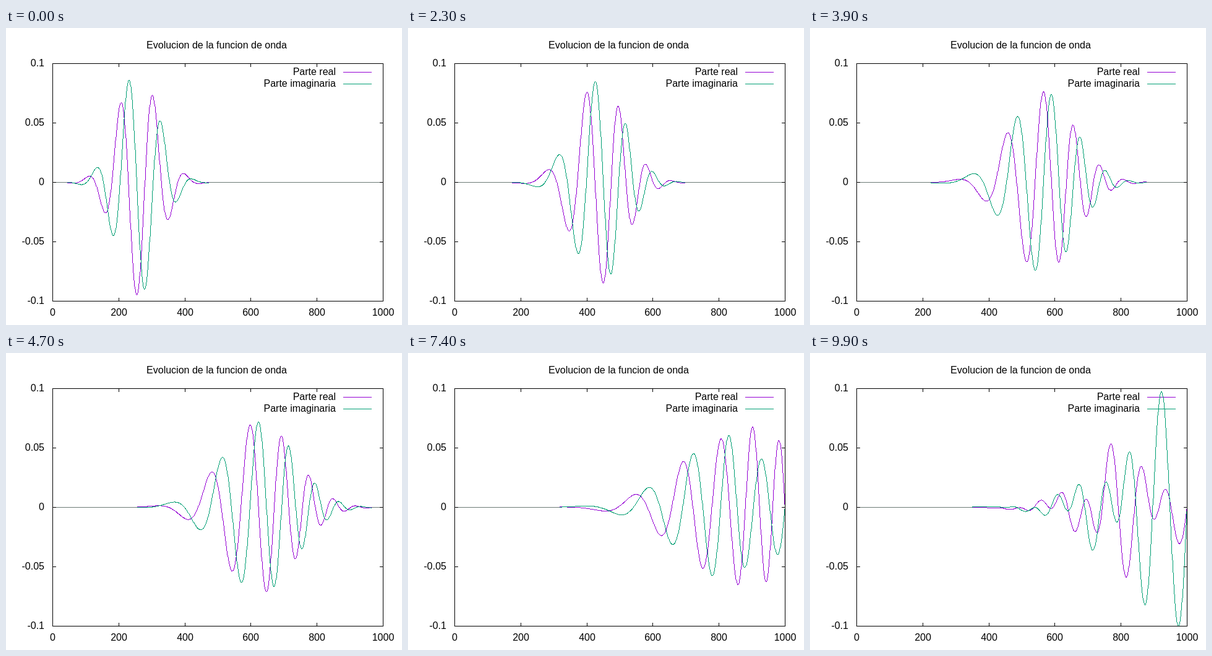
Recreate the animation shown at these times as an HTML page with a canvas. Size 640 by 480 pixels, loop 10000 ms.

```html
<!DOCTYPE html>
<html lang="es">
<head>
<meta charset="utf-8">
<title>Evolucion de la funcion de onda</title>
<style>
  html, body { margin: 0; width: 100%; height: 100%; overflow: hidden; background: #fff; }
  svg, canvas { position: absolute; left: 0; top: 0; }
  text { font: 16px "Liberation Sans", Arial, sans-serif; }
  .mid { text-anchor: middle; }
  .end { text-anchor: end; }
</style>
</head>
<body>
<svg width="640" height="480">
  <g class="mid">
    <text x="340.5" y="33">Evolucion de la funcion de onda</text>
    <text x="75.5" y="465">0</text>
    <text x="182.5" y="465">200</text>
    <text x="289.5" y="465">400</text>
    <text x="395.5" y="465">600</text>
    <text x="502.5" y="465">800</text>
    <text x="609.5" y="465">1000</text>
  </g>
  <g class="end">
    <text x="62" y="62">0.1</text>
    <text x="62" y="158">0.05</text>
    <text x="62" y="254">0</text>
    <text x="62" y="350">-0.05</text>
    <text x="62" y="446">-0.1</text>
    <text x="533" y="76">Parte real</text>
    <text x="533" y="95">Parte imaginaria</text>
  </g>
</svg>
<canvas id="plot" width="640" height="480"></canvas>
<script>
const N = 1000, STEPS = 100, FRAME_MS = 100;
const LEFT = 75, RIGHT = 609, TOP = 57, BOTTOM = 441, ZERO = 249;
const PURPLE = '#9400d3', GREEN = '#009e73', OVERLAP = '#6c7a75';
const ctx = document.getElementById('plot').getContext('2d');

// Gaussian packet with ten cycles across the box
const k0 = 2 * Math.PI * 10 / N, sigma = N / 16;
const amp = 1 / Math.sqrt(sigma * Math.sqrt(Math.PI));
const zeros = () => new Float64Array(N + 1);
let re = zeros(), im = zeros();
for (let j = 1; j < N; j++) {
  const g = amp * Math.exp(-((j - N / 4) ** 2) / (2 * sigma ** 2));
  re[j] = g * Math.cos(k0 * j);
  im[j] = g * Math.sin(k0 * j);
}

// Crank-Nicolson for a free particle between hard walls, time step 1 / (4 k0^2)
const c = 8 * k0 * k0;
const invRe = zeros(), invIm = zeros();
for (let j = 1; j < N; j++) {
  const a = -2 - invRe[j - 1], b = c - invIm[j - 1], m = a * a + b * b;
  invRe[j] = a / m;
  invIm[j] = -b / m;
}

function advance() {
  const bRe = zeros(), bIm = zeros(), nextRe = zeros(), nextIm = zeros();
  for (let j = 1; j < N; j++) {
    const a = -2 * c * im[j] - bRe[j - 1], b = 2 * c * re[j] - bIm[j - 1];
    bRe[j] = a * invRe[j] - b * invIm[j];
    bIm[j] = a * invIm[j] + b * invRe[j];
  }
  let xRe = 0, xIm = 0;
  for (let j = N - 1; j > 0; j--) {
    const a = bRe[j] - (invRe[j] * xRe - invIm[j] * xIm);
    const b = bIm[j] - (invRe[j] * xIm + invIm[j] * xRe);
    xRe = a;
    xIm = b;
    nextRe[j] = a - re[j];
    nextIm[j] = b - im[j];
  }
  re = nextRe;
  im = nextIm;
}

const states = [];
for (let n = 0; n < STEPS; n++) {
  advance();
  states.push([re, im]);
}

const px = j => Math.round(LEFT + j * (RIGHT - LEFT) / N);
const py = v => Math.min(BOTTOM, Math.max(TOP, Math.round(ZERO - v * 1920)));

function rect(color, x, y, w, h) {
  ctx.fillStyle = color;
  ctx.fillRect(x, y, w, h);
}

// Hard-edged one-pixel polyline
function curve(values, color) {
  for (let j = 0; j < N; j++) {
    const x = px(j), y = py(values[j]);
    const dx = px(j + 1) - x, dy = py(values[j + 1]) - y;
    const n = Math.max(Math.abs(dx), Math.abs(dy), 1);
    for (let i = 0; i <= n; i++)
      rect(color, Math.round(x + dx * i / n), Math.round(y + dy * i / n), 1, 1);
  }
}

// Flat ends where both curves share the zero row
function flatEnds([a, b]) {
  const flat = j => py(a[j]) === ZERO && py(b[j]) === ZERO;
  let l = 0, r = N;
  while (l < N && flat(l)) l++;
  while (r > l && flat(r)) r--;
  rect(OVERLAP, LEFT, ZERO, px(l) - LEFT, 1);
  rect(OVERLAP, px(r) + 1, ZERO, RIGHT - px(r), 1);
}

function frameBox() {
  const w = RIGHT - LEFT + 1, h = BOTTOM - TOP + 1;
  for (const y of [TOP, BOTTOM]) rect('#000', LEFT, y, w, 1);
  for (const x of [LEFT, RIGHT]) rect('#000', x, TOP, 1, h);
  for (let j = 200; j < N; j += 200)
    for (const y of [TOP, BOTTOM - 5]) rect('#000', px(j), y, 1, 6);
  for (let y = TOP + 96; y < BOTTOM; y += 96)
    for (const x of [LEFT, RIGHT - 5]) rect('#000', x, y, 6, 1);
}

function draw(state) {
  ctx.clearRect(0, 0, 640, 480);
  rect(PURPLE, 545, 71, 46, 1);
  curve(state[0], PURPLE);
  rect(GREEN, 545, 90, 46, 1);
  curve(state[1], GREEN);
  flatEnds(state);
  frameBox();
}

let shown = -1;
function tick() {
  const n = Math.floor(performance.now() / FRAME_MS) % STEPS;
  if (n !== shown) draw(states[shown = n]);
  requestAnimationFrame(tick);
}
tick();
</script>
</body>
</html>
```
